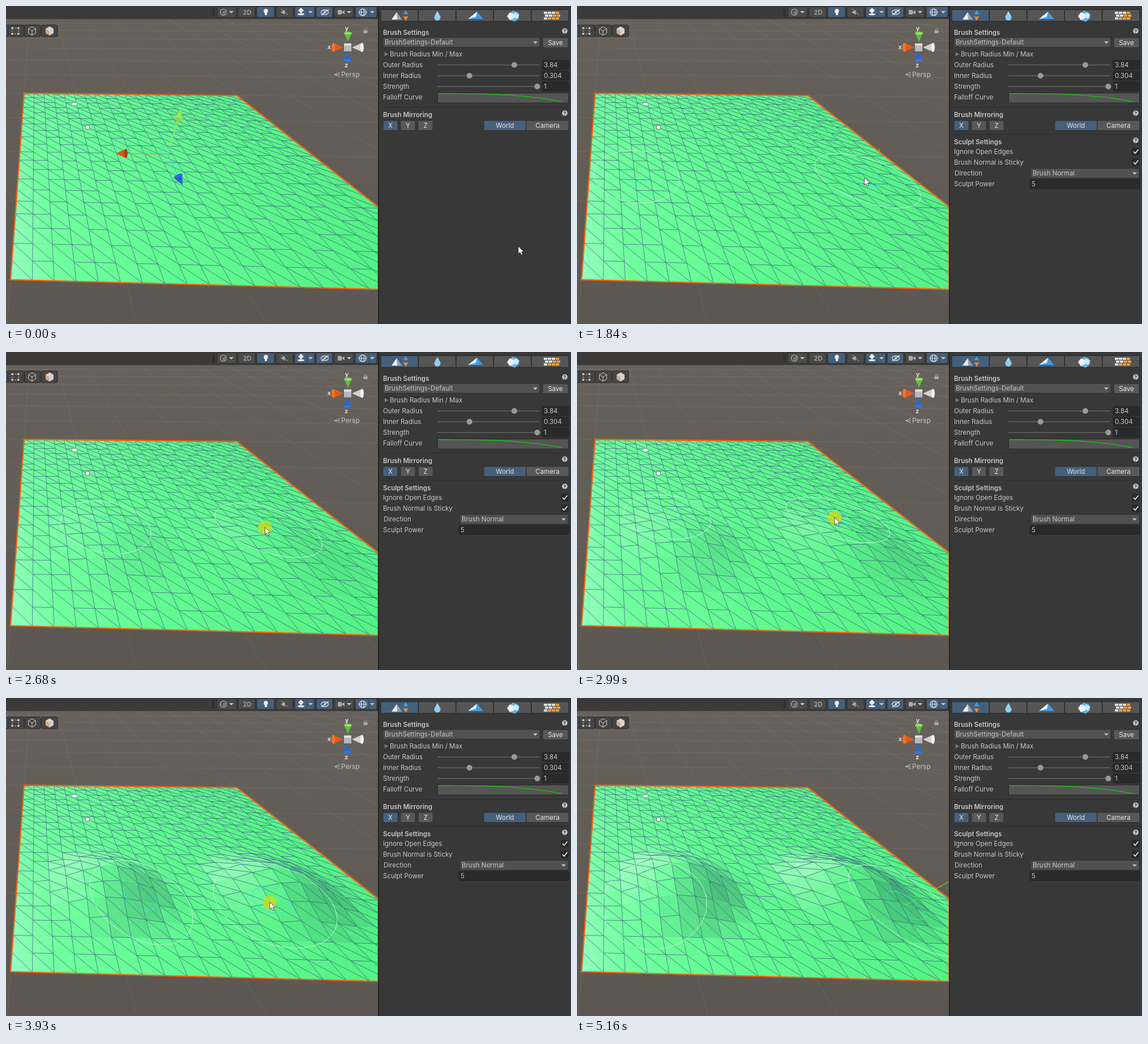
Animation, 998 px wide and 561 px high, one loop 5630 ms. Source, as an HTML page with a canvas:

```html
<!DOCTYPE html>
<html>
<head>
<meta charset="utf-8">
<style>
html, body { margin: 0; width: 100%; height: 100%; overflow: hidden; background: #383838; }
canvas { display: block; }
</style>
</head>
<body>
<canvas id="stage" width="998" height="561"></canvas>
<script>
const c = document.getElementById('stage').getContext('2d');
const LOOP = 5630, STEP = 76.6, LAST = 67;
const BLUE = '#46607c', BUTTON = '#585858', TEXT = '#c6c6c6', FIELD = '#2a2a2a', EDGE = '#2d2d2d';

// ---- drawing helpers ----
function paint(fill, stroke, width = 1) {
  if (fill) { c.fillStyle = fill; c.fill(); }
  if (stroke) { c.strokeStyle = stroke; c.lineWidth = width; c.stroke(); }
}
function rect(x, y, w, h, fill, r = 0, stroke) {
  c.beginPath();
  c.roundRect(x, y, w, h, r);
  paint(fill, stroke);
}
function path(points, fill, stroke, width, close = true) {
  c.beginPath();
  for (const [x, y] of points) c.lineTo(x, y);
  if (close) c.closePath();
  paint(fill, stroke, width);
}
const line = (x1, y1, x2, y2, color, width) => path([[x1, y1], [x2, y2]], null, color, width, false);
function oval(x, y, rx, ry, fill, stroke, width) {
  c.beginPath();
  c.ellipse(x, y, rx, ry, 0, 0, 7);
  paint(fill, stroke, width);
}
// regular polygon; turn 0 points right, measured in full turns
function ngon(x, y, r, n, turn, fill, stroke) {
  const points = [];
  for (let i = 0; i < n; i++) {
    const a = (turn + i / n) * 2 * Math.PI;
    points.push([x + r * Math.cos(a), y + r * Math.sin(a)]);
  }
  path(points, fill, stroke);
}
// cone with its tip at (x, y), opening towards the angle
function cone(x, y, angle, length, side, cap) {
  c.save();
  c.translate(x, y);
  c.rotate(angle);
  path([[0, 0], [length, -length * .45], [length, length * .45]], side);
  oval(length, 0, length * .16, length * .45, cap);
  c.restore();
}
function text(s, x, y, { weight = 400, align = 'left', color = TEXT, size = 11.5 } = {}) {
  c.font = `${weight} ${size}px Inter, sans-serif`;
  c.textAlign = align;
  c.fillStyle = color;
  c.fillText(s, x, y + 4.2);
}
const caret = (x, y) => path([[x - 4, y - 2], [x + 4, y - 2], [x, y + 2]], TEXT);

// ---- ground plane in perspective; u and v run from 0 to 1 over the mesh ----
const G = -.0174, H = -.5438;
const AX = 368.9, BX = -28.35, AY = 1.25, BY = 66.3, X0 = 32, Y0 = 154;
function project(u, v, h = 0) {
  const d = 1 + G * u + H * v;
  const x = (X0 + AX * u + BX * v) / d, y = (Y0 + AY * u + BY * v) / d;
  return [x + (.28 + (x - 285) * .0012) * h / d, y - h / d];
}
function unproject(x, y) {
  const a = AX - G * x, b = BX - H * x, p = AY - G * y, q = BY - H * y;
  const e = x - X0, f = y - Y0, det = a * q - b * p;
  return [(e * q - b * f) / det, (a * f - e * p) / det];
}

// ---- motion ----
// pointer stops: step, x, y
const STOPS = [
  [0, 905, 424], [7, 695, 18], [9, 695, 20], [16, 680, 205], [19, 680, 210], [26, 465, 326],
  [30, 461, 333], [39, 455, 292], [45, 472, 354], [57, 460, 366], [62, 580, 365], [66, 886, 516]
];
const OPEN = 7, HOVER = 21, SCULPT = 30, SCULPT_END = 60, LEAVE = 62;
const PRESSES = [[OPEN, 9], [16, 17], [28, 59]];

function pointerAt(k) {
  const i = Math.max(1, STOPS.findIndex(stop => stop[0] >= k));
  const [k0, x0, y0] = STOPS[i - 1], [k1, x1, y1] = STOPS[i];
  const p = (k - k0) / (k1 - k0), ease = p * p * (3 - 2 * p);
  return [x0 + (x1 - x0) * ease, y0 + (y1 - y0) * ease];
}

let growth = 0;
function grow(k) {
  const p = Math.min(1, Math.max(0, (k - SCULPT) / (SCULPT_END - SCULPT)));
  growth = 1 - (1 - p) ** 1.5;
}
// two mirrored hills
function height(u, v) {
  const du = Math.abs(u - .5) - .24, dv = v - .71;
  return growth * 21 * Math.max(0, 1 - (du * du + dv * dv) / .042) ** 2;
}
function slope(u, v) {
  const e = .01;
  return [(height(u + e, v) - height(u - e, v)) / (2 * e), (height(u, v + e) - height(u, v - e)) / (2 * e)];
}

// ---- scene ----
function background() {
  const sky = c.createLinearGradient(0, 20, 0, 561);
  sky.addColorStop(0, '#67615b');
  sky.addColorStop(1, '#5c5751');
  c.fillStyle = sky;
  c.fillRect(0, 0, 657, 561);
  const color = 'rgba(150,150,150,.2)';
  for (let n = -3; n < 4; n += .25) {
    line(...project(n, -2.5), ...project(n, 1.4), color);
    if (n < 1.3) line(...project(-3, n), ...project(5, n), color);
  }
}

function mesh() {
  const COLS = 21, ROWS = 20, INK = 'rgba(58,70,135,.75)';
  const green = c.createLinearGradient(8, 450, 657, 330);
  green.addColorStop(0, '#94ffbd');
  green.addColorStop(.12, '#70ff9e');
  green.addColorStop(.4, '#62fb92');
  green.addColorStop(1, '#53f184');
  function node(i, j) {
    const u = i / COLS, v = j / ROWS, h = height(u, v) * (1 + .12 * Math.sin(i * 7 + j * 11));
    return Object.assign(project(u, v, h), { h });
  }
  // light comes from the upper left
  function face(points, rise, fall) {
    path(points, green, green, .6);
    const s = (rise * COLS + fall * ROWS * .7) / 210;
    if (s) path(points, s > 0 ? `rgba(225,255,240,${s * .5})` : `rgba(35,95,85,${-s * .42})`);
  }
  for (let j = 0; j < ROWS; j++) for (let i = 0; i < COLS; i++) {
    const a = node(i, j), b = node(i + 1, j), d = node(i + 1, j + 1), e = node(i, j + 1);
    face([a, b, d], b.h - a.h, d.h - b.h);
    face([a, d, e], d.h - e.h, e.h - a.h);
    line(...a, ...e, INK, .85);
    line(...a, ...d, INK, .85);
    if ((i * 3 + j * 2) % 5 < 3) line(...a, ...b, INK, .85);
  }
  path([project(0, 0), project(1, 0), project(1, 1), project(0, 1)], null, '#ec6418', 2.4);
  line(657, 354, 657, 500, '#ec6418', 2);
}

function brush(k) {
  const [x, y] = pointerAt(Math.min(k, LEAVE));
  let u, v, dx = 0, dy = 0;
  for (let n = 0; n < 5; n++) {
    [u, v] = unproject(x - dx, y - dy);
    const flat = project(u, v), raised = project(u, v, height(u, v));
    dx = raised[0] - flat[0];
    dy = raised[1] - flat[1];
  }
  if (u > 1 || v > 1) return;
  for (const centre of [u, 1 - u]) {
    const h = height(centre, v), [su, sv] = slope(centre, v);
    for (const [r, color] of [[.133, 'rgba(205,255,230,.85)'], [.042, '#35e6dc']]) {
      const ring = [];
      for (let t = 0; t < 6.28; t += .1) {
        const a = r * Math.cos(t), b = r * Math.sin(t);
        ring.push(project(centre + a, v + b, h + (su * a + sv * b) * .5));
      }
      path(ring, null, color);
    }
    line(...project(centre, v, h), ...project(centre - su * .0003, v - sv * .0003, h + 33), '#5cf53c');
  }
}

function moveGizmo() {
  for (const [x, y, shaft, side, cap] of [
    [194, 260, '#ef8b3c', '#e04f14', '#9b4216'],
    [309, 183, '#a5f04a', '#9bea4b', '#8ad65c'],
    [312, 316, '#35cfe0', '#2860d8', '#2a6be0']
  ]) {
    line(285, 261, x, y, shaft, 1.5);
    cone(x, y, Math.atan2(261 - y, 285 - x), 18, side, cap);
  }
  rect(272, 249, 16, 12, 'rgba(60,220,220,.15)', 0, '#4fdcc8');
}

function sceneIcons() {
  oval(121, 173, 4.5, 2.5, '#fff', '#a6b8b0');
  oval(144, 214, 4, 4, '#f5f5f5', '#55755f');

  // orientation gizmo
  const quarter = Math.PI / 2;
  cone(604, 63, -quarter, 15, '#63b947', '#8be85e');
  cone(596, 73, 2 * quarter, 18, '#e35b1b', '#f4742c');
  cone(611, 73, 0, 18, '#d2d2d2', '#f4f4f4');
  cone(603, 80, quarter, 16, '#2f66c5', '#3a72dc');
  rect(597, 66, 13, 14, '#b9b9b9');
  rect(597, 66, 13, 4, '#dedede');
  const label = { weight: 600, align: 'center', color: '#eee', size: 11 };
  text('y', 602, 39, label);
  text('x', 571, 72, label);
  text('z', 601, 104, label);
  rect(631.5, 43, 7, 5, '#aaa');
  oval(635, 42.5, 2.3, 2.5, null, '#aaa');
  for (const dy of [-4, 0, 4]) line(580, 121, 590, 121 + dy, '#bbb');
  text('Persp', 592, 121, { size: 12 });
}

function cube(x, y, front) {
  ngon(x, y, 7.5, 6, .25, front && '#d4d4d4', '#ccc');
  if (front) path([[x - 6.5, y - 4], [x, y], [x, y + 7], [x - 6.5, y + 4]], front);
  for (const turn of [1, 5, 9]) {
    const a = turn * Math.PI / 6 - Math.PI / 3 * (turn === 1 ? 1 : 1) + Math.PI / 3 * 1;
    line(x, y, x + 7.5 * Math.cos(a + Math.PI * 0), y + 7.5 * Math.sin(a) * (turn === 9 ? -1 : turn === 1 ? -1 : -1), '#ccc');
  }
}

function toolbar() {
  rect(0, 0, 657, 23, '#3b3a39');
  for (const x of [365.5, 367.5]) line(x, 4, x, 18, '#262626');
  let left = 373;
  [34, 30, 31, 30, 35, 29, 34, 38].forEach((w, n) => {
    rect(left, 1.5, w, 18.5, [2, 4, 5, 7].includes(n) ? BLUE : '#4b4b4b', 2, '#303030');
    left += w + 3;
  });
  for (const x of [398, 538, 606, 647]) caret(x, 11);
  oval(384, 11, 5.5, 5.5, null, '#bbb', 1.2);
  oval(386, 12, 4, 3.5, '#777');
  text('2D', 426, 11, { align: 'center', size: 11 });
  oval(459, 9, 3.7, 4, '#eee');
  rect(457, 12, 4, 4, '#eee');
  ngon(490, 11, 5, 3, .5, '#aaa');
  line(486, 5, 498, 16, '#aaa');
  ngon(521, 8, 5, 4, 0, '#eee');
  oval(521, 14.5, 6, 1.8, '#eee');
  oval(563, 11, 6.5, 4, null, '#ddd', 1.3);
  oval(563, 11, 2, 2, '#ddd');
  line(557, 16, 570, 6, '#eee', 1.3);
  rect(586, 7, 7, 8, '#aaa', 1);
  ngon(596, 11, 4, 3, .5, '#aaa');
  for (const rx of [6, 2.5]) oval(630, 11, rx, 6, null, '#ddd', 1.2);
  line(622, 11, 638, 11, '#ddd');
  for (const x of [531.5, 640.5]) line(x, 2, x, 20, '#34485c');

  rect(-3, 34, 6, 20, BLUE, 0, '#222');
  for (const x of [3.5, 32.5, 62.5]) rect(x, 33.5, 28.5, 20.5, '#474543', 2, '#2b2a29');
  c.setLineDash([3, 2]);
  rect(11, 39, 11, 10, null, 0, '#bbb');
  c.setLineDash([]);
  for (const x of [11, 22]) for (const y of [39, 49]) rect(x - 1.5, y - 1.5, 3, 3, '#ddd');
  cube(46, 44);
  cube(77, 44, '#e9a06a');
}

// ---- settings panel ----
function tabs(active) {
  for (let n = 0; n < 5; n++)
    rect(662 + n * 66.5, 6.5, 66, 20.5, active && !n ? BLUE : '#555', 1, '#272727');
  path([[681, 24], [690, 11], [699, 24]], '#f0f0f0');
  path([[690, 11], [699, 24], [691, 24]], '#9aa0a6');
  ngon(706, 12, 5, 3, -.25, '#3f9be8');
  ngon(706, 21, 5, 3, .25, '#f58a25');
  path([[762, 9], [767, 18], [757, 18]], '#a8dcfa');
  oval(762, 20, 5.5, 5.5, '#8fd0f7');
  path([[816, 23], [832, 10], [843, 23]], '#3f9be8');
  path([[816, 23], [832, 10], [830, 19]], '#eef7fd');
  ngon(897, 18, 10, 6, .05, '#5eb2ec');
  ngon(892, 18, 7, 5, .1, '#f0f0f0');
  ngon(901, 17, 6, 4, .2, '#cdeafa');
  for (let row = 0; row < 3; row++) for (let col = 0; col < 4; col++)
    rect(950 + col * 7 + row % 2 * 2, 10 + row * 5, 6, 4, col + row > 2 ? '#f3a03d' : '#dedede');
}

function section(title, y) {
  text(title, 666, y, { weight: 600 });
  oval(987, y - 3, 4.8, 4.8, TEXT);
  text('?', 987, y - 3, { weight: 700, align: 'center', color: '#333', size: 8.5 });
}
function button(label, x, y, w, on) {
  rect(x, y, w, 17.5, on ? BLUE : BUTTON, 2, '#303030');
  text(label, x + w / 2, y + 9, { align: 'center', color: '#e4e4e4' });
}
function dropdown(label, x, y, w) {
  rect(x, y, w, 17, '#515151', 2, '#303030');
  text(label, x + 3, y + 8);
  caret(x + w - 8, y + 9);
}
function field(value, x, y, w) {
  rect(x, y - 8, w, 16, FIELD, 2, '#222');
  text(value, x + 3, y);
}
function slider(label, y, fraction, value) {
  text(label, 666, y);
  line(762, y, 942, y, '#656565', 1.5);
  oval(762 + 180 * fraction, y, 5, 5, '#999');
  field(value, 947, y, 47);
}
function toggle(label, y) {
  text(label, 666, y);
  rect(981, y - 6, 12, 12, FIELD, 2, '#222');
  path([[983, y], [986, y + 3], [991.5, y - 4]], null, '#ddd', 1.8, false);
}

function panel(active) {
  rect(658, 0, 340, 561, '#383838');
  line(658, 0, 658, 561, '#202020', 1.5);
  tabs(active);
  section('Brush Settings', 47);
  dropdown('BrushSettings-Default', 666, 55.5, 277);
  button('Save', 948, 56, 45);
  ngon(671, 85, 4.5, 3, 0, '#777');
  text('Brush Radius Min / Max', 678, 85);
  slider('Outer Radius', 104, .755, '3.84');
  slider('Inner Radius', 123, .315, '0.304');
  slider('Strength', 142, .98, '1');
  text('Falloff Curve', 666, 161);
  rect(762.5, 153.5, 231, 17.5, '#555', 0, '#282828');
  const falloff = [];
  for (let t = 0; t <= 1; t += .05) falloff.push([763 + 230 * t, 154.5 + 16.5 * t ** 3]);
  path(falloff, null, '#13c813', 1.3, false);
  line(662, 178.5, 998, 178.5, EDGE);
  section('Brush Mirroring', 192);
  ['X', 'Y', 'Z'].forEach((s, n) => button(s, 666 + n * 31, 202, 26, !n));
  button('World', 844, 202, 74.5, true);
  button('Camera', 919, 202, 75);
  if (!active) return;
  line(662, 226.5, 998, 226.5, EDGE);
  section('Sculpt Settings', 240);
  toggle('Ignore Open Edges', 257);
  toggle('Brush Normal is Sticky', 276);
  text('Direction', 667, 294.5);
  dropdown('Brush Normal', 802, 286.5, 191);
  text('Sculpt Power', 666, 314);
  field('5', 800, 314, 194);
}

function pointer(k) {
  const [x, y] = pointerAt(k);
  if (PRESSES.some(([from, to]) => k >= from && k <= to)) oval(x, y + 1, 12, 12, 'rgba(205,220,25,.78)');
  const shape = [[0, 0], [0, 13], [3, 10.3], [5.2, 15], [7.5, 14], [5.4, 9.5], [9.5, 9.3]];
  path(shape.map(([a, b]) => [x + a, y + b]), '#fff', '#333', .8);
}

function draw(k) {
  const active = k >= OPEN;
  grow(k);
  c.save();
  c.beginPath();
  c.rect(0, 0, 657.5, 561);
  c.clip();
  background();
  mesh();
  if (!active) moveGizmo();
  if (k >= HOVER) brush(k);
  sceneIcons();
  toolbar();
  c.restore();
  panel(active);
  if (k < LAST) pointer(k);
}

let shown = -1;
function tick() {
  const t = performance.now() % LOOP;
  const k = Math.min(LAST, Math.floor(t / STEP + .3));
  if (k !== shown) draw(shown = k);
  requestAnimationFrame(tick);
}
tick();
</script>
</body>
</html>
```
